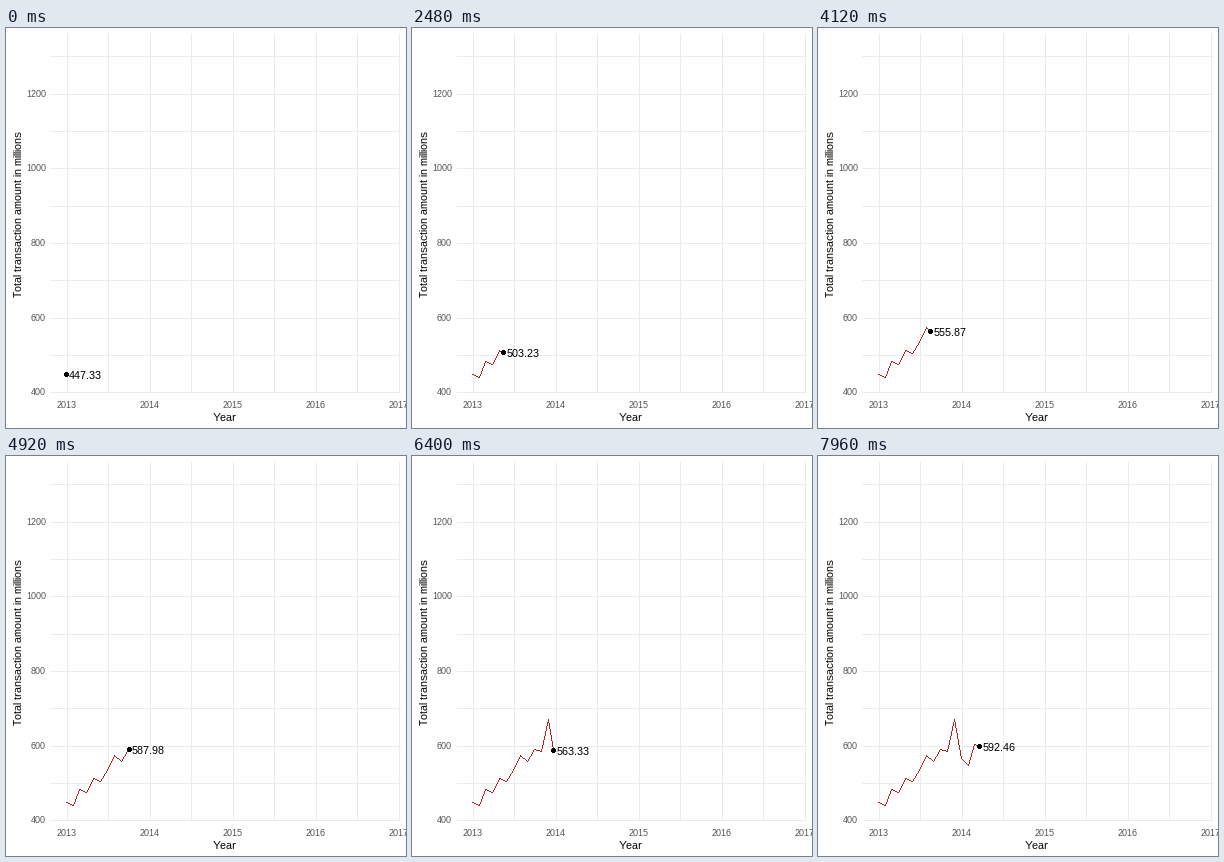
A matplotlib script that plays this animation: 400x400 px, repeating every 8 s.

```python
import numpy as np
import matplotlib.pyplot as plt
from matplotlib.animation import FuncAnimation
from matplotlib.collections import PolyCollection
from matplotlib.patches import Circle

plt.rcParams.update({
    "font.family": "Liberation Sans",
    "text.hinting": "native",
    "text.hinting_factor": 1,
    "text.kerning_factor": 6,      # no pair kerning
    "toolbar": "None",
})

SIZE, DPI = 400, 100
PT = 72 / DPI                      # points per pixel
FRAMES, INTERVAL = 200, 40
DAYS_PER_FRAME = 2.242
LEFT, RIGHT, TOP, BOTTOM = 44, 394, 5, 364
GRID, TICK_INK, LINE = "#ebebeb", "#4d4d4d", "#b22222"

MONTH_LENGTHS = [31, 28, 31, 30, 31, 30, 31, 31, 30, 31, 30, 31, 31, 28, 31]
DAYS = np.cumsum([0] + MONTH_LENGTHS)
AMOUNTS = np.array([447.33, 438.61, 480.24, 474.02, 510.52, 503.23, 532.74, 571.96,
                    555.87, 587.98, 582.46, 669.22, 563.33, 544.67, 602.38, 592.46])
UNIT = np.array([[0, 0], [1, 0], [1, 1], [0, 1]])


def x_of(day):
    return 60.3 + day * 83 / 365


def y_of(amount):
    return 363.7 - (amount - 400) * 74.65 / 200


def snap(v):
    return np.floor(v) + 0.5


def pixel_chain(corners):
    """Unit squares along a one pixel wide, unsmoothed polyline."""
    cells = [corners[:1]]
    for a, b in zip(corners[:-1], corners[1:]):
        steps = int(np.abs(b - a).max())
        t = np.arange(1, steps + 1)[:, None] / max(steps, 1)
        cells.append(np.floor(a + (b - a) * t + 0.5))
    return np.concatenate(cells)[:, None] + UNIT


fig = plt.figure(figsize=(SIZE / DPI, SIZE / DPI), dpi=DPI, facecolor="white")
ax = fig.add_axes([0, 0, 1, 1])
ax.set_xlim(0, SIZE)
ax.set_ylim(SIZE, 0)
ax.axis("off")


def write(x, y, s, px, color="black", **kw):
    kw = {"ha": "center", "va": "baseline", **kw}
    return ax.text(x, y, s, fontsize=px * PT, color=color, **kw)


def rule(xs, ys):
    ax.plot(xs, ys, color=GRID, lw=PT, solid_capstyle="butt", zorder=1)


for amount in range(400, 1301, 100):
    y = snap(y_of(amount))
    rule([LEFT, RIGHT], [y, y])
    if amount % 200 == 0:
        write(40, y + 3.5, str(amount), 9.5, TICK_INK, ha="right")

for half in range(9):
    x = snap(60.3 + half * 41.5)
    rule([x, x], [TOP, BOTTOM])
    if half % 2 == 0:
        write(x, 380, str(2013 + half // 2), 9.5, TICK_INK)

write(219, 393, "Year", 11)
write(18, 186, "Total transaction amount in millions", 11, rotation=90,
      ha="right", va="center")

trail = PolyCollection([], facecolor=LINE, linewidth=0, antialiased=False, zorder=3)
ax.add_collection(trail, autolim=False)
dot = Circle((0, 0), 2.05, fc="black", lw=0, antialiased=False, zorder=4)
ax.add_patch(dot)
label = write(0, 0, "", 11, ha="left", zorder=5)


def draw(i):
    day = i * DAYS_PER_FRAME
    amount = np.interp(day, DAYS, AMOUNTS)
    past = DAYS < day
    xs = x_of(np.append(DAYS[past], day))
    ys = y_of(np.append(AMOUNTS[past], amount))
    corners = np.floor(np.column_stack([xs, ys]))
    trail.set_verts(pixel_chain(corners))
    dot.center = corners[-1] + 0.5
    nearest = np.abs(DAYS - day).argmin()
    label.set_text(f"{AMOUNTS[nearest]:.2f}")
    label.set_position((np.floor(xs[-1] + 3.4), corners[-1, 1] + 5))
    return trail, dot, label


anim = FuncAnimation(fig, draw, frames=FRAMES, interval=INTERVAL,
                     init_func=lambda: draw(0), repeat=True, repeat_delay=0, blit=False)
plt.show()
```
